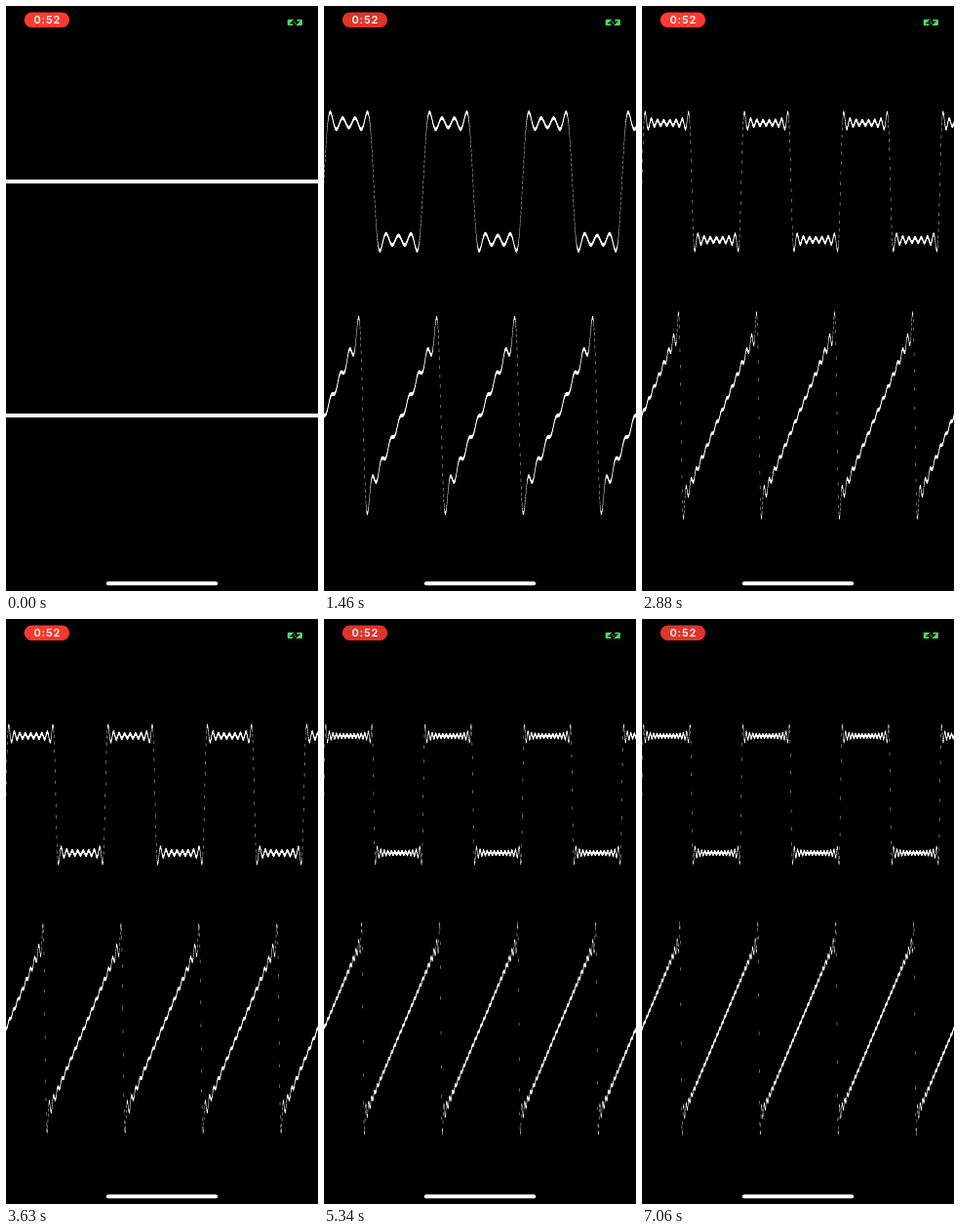
These frames come from a looping animation (320 px wide and 600 px high, 7.09 s). An HTML page with a canvas:

```html
<!DOCTYPE html>
<html lang="en">
<head>
<meta charset="utf-8">
<title>Fourier waves</title>
<style>
  html, body { margin: 0; width: 100%; height: 100%; overflow: hidden; background: #000; }
  canvas, svg { position: absolute; left: 0; top: 0; width: 320px; height: 600px; }
  text { font: 600 11px Inter, "Liberation Sans", sans-serif; letter-spacing: .9px; }
</style>
</head>
<body>
<canvas id="scope" width="320" height="600"></canvas>
<svg viewBox="0 0 320 600">
  <rect id="pill" x="18.7" y="6.6" width="46.4" height="15.4" rx="7.7" fill="#ff3b30"/>
  <text x="42.4" y="18.3" text-anchor="middle" fill="#fff">0:52</text>
  <g fill="#4fd962">
    <rect x="288.7" y="13.8" width="15.2" height="6.2" rx="1"/>
    <path d="M298.2 12.4 L292.6 17.5 H295.6 L294.4 21.4 L300 16.3 H297 Z" stroke="#000" stroke-width="1.5"/>
  </g>
  <rect x="102.8" y="590.3" width="114.4" height="4" rx="2" fill="#fff"/>
</svg>
<script>
const LOOP = 7090, WIDTH = 320, SAMPLES = 1125, MAX_TERMS = 30;
const TERM_MS = 200, FIRST_TERM = 50;
const STEP = WIDTH / SAMPLES, SCALE = 60, SAW_PERIOD = 80;
const ctx = document.getElementById('scope').getContext('2d');
const pill = document.getElementById('pill');
let drawn = -1;

function square(x, terms) {
  let sum = 0;
  const a = x * 2 * Math.PI / (SAW_PERIOD * 4 / Math.PI);
  for (let k = 1; k <= terms; k += 2) sum += Math.sin(k * a) / k;
  return sum * 4 / Math.PI;
}

function saw(x, terms) {
  let sum = 0;
  const a = x * 2 * Math.PI / SAW_PERIOD;
  for (let k = 1; k <= terms; k++) sum += (k % 2 ? 1 : -1) * Math.sin(k * a) / k;
  return sum;
}

// Overlapping slivers add up to white on flat parts and stay grey on steep ones.
function plot(wave, mid, terms) {
  for (let i = 0; i <= SAMPLES; i++) {
    const x = i * STEP;
    ctx.fillRect(x - .22, mid - SCALE * wave(x, terms) - 1.75, .44, 3.5);
  }
}

function draw(terms) {
  ctx.globalCompositeOperation = 'source-over';
  ctx.clearRect(0, 0, WIDTH, 600);
  ctx.globalCompositeOperation = 'lighter';
  ctx.fillStyle = 'rgb(238,236,226)';
  plot(square, 180, terms);
  plot(saw, 420, terms);
}

// One more harmonic per timer tick, until the cap.
function termsAt(t) {
  return Math.min(MAX_TERMS, Math.floor((t - FIRST_TERM) / TERM_MS) + 1);
}

const clamp = v => Math.max(0, Math.min(1, v));

// The recording pill dims briefly in every pulse.
function pillColor(t) {
  const p = t % 1900;
  const dim = Math.min(clamp((p - 1000) / 280), clamp((1820 - p) / 270));
  return `rgb(${255 - 33 * dim},${59 - 6 * dim},${48 - 5 * dim})`;
}

function frame(now) {
  const t = now % LOOP;
  const terms = termsAt(t);
  if (terms !== drawn) draw(drawn = terms);
  pill.setAttribute('fill', pillColor(t));
  requestAnimationFrame(() => frame(performance.now() - start));
}

const start = performance.now();
frame(0);
</script>
</body>
</html>
```
